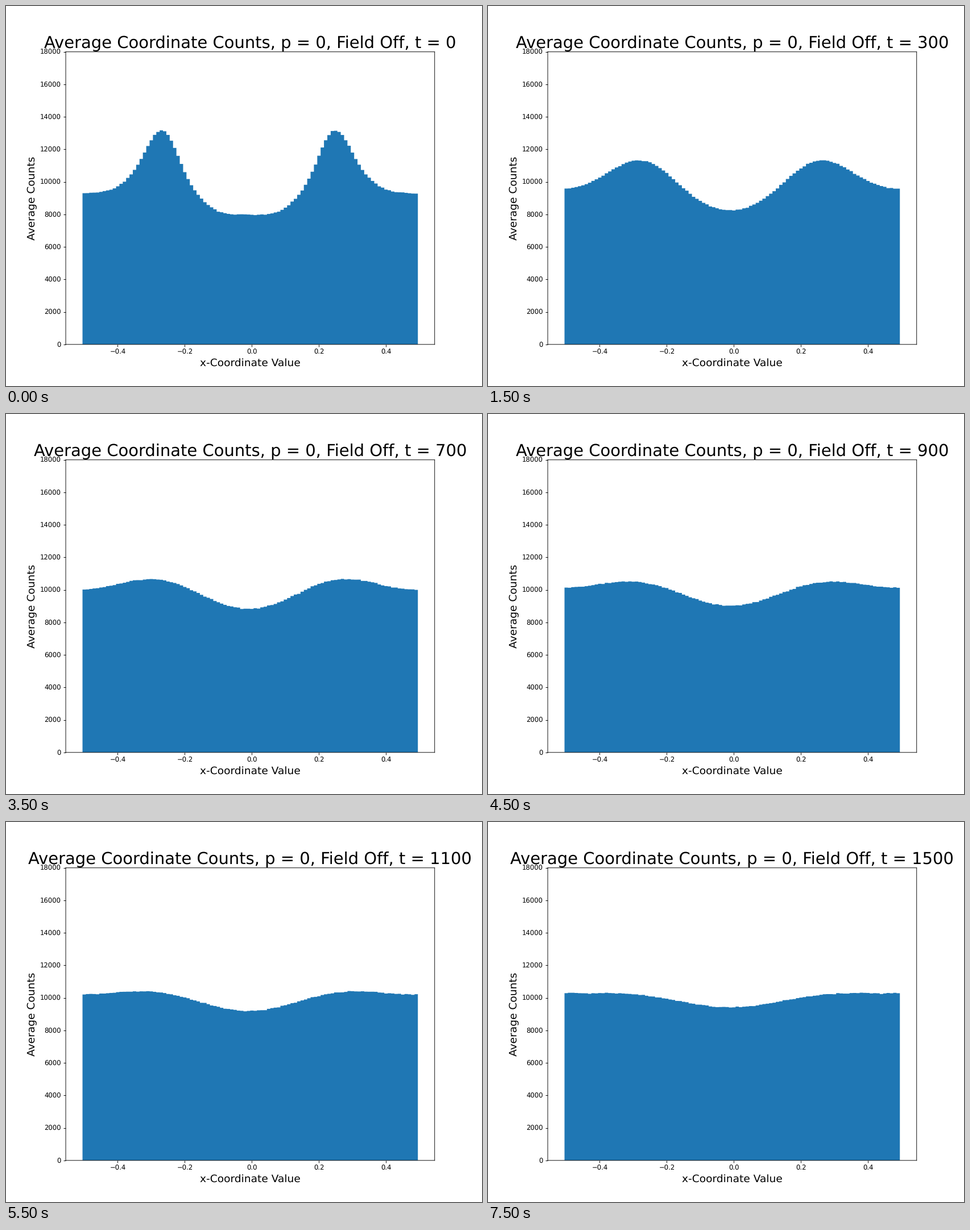
Write a matplotlib script that moves like this. It is 837x669 px and loops after 8 s.

```python
import numpy as np
import matplotlib.pyplot as plt
from matplotlib.animation import FuncAnimation

WIDTH, HEIGHT, DPI = 837, 669, 83.7
FRAMES, INTERVAL, STEP = 16, 500, 100
BINS, CENTER = 100, 49
DECAY = 0.000435  # decay rate of the slowest mode
NOISE = 16

# Starting profile, every fifth bin from the middle to the edge.
START = np.array([7970, 8000, 8290, 9200, 11100, 13100,
                  12190, 10480, 9620, 9355, 9300])

# Cosine modes of the mirror-symmetric, periodic profile.
modes = np.arange(len(START))
node_basis = np.cos(np.pi * np.outer(modes, modes) / modes[-1])
amplitude = np.linalg.solve(node_basis, START)
distance = np.abs(np.arange(BINS) - CENTER)
bin_basis = np.cos(2 * np.pi * np.outer(distance, modes) / BINS)


def counts(t):
    """Counts per bin after the starting profile has diffused for time t."""
    smooth = bin_basis @ (amplitude * np.exp(-DECAY * modes**2 * t))
    return smooth + np.random.default_rng(t).normal(0, NOISE, BINS)


# Soft edges: no snapping of lines or glyphs to whole pixels.
plt.rcParams.update({
    "font.family": "DejaVu Sans",
    "path.snap": False,
    "text.hinting": "none",
})
size = ((WIDTH + 0.001) / DPI, (HEIGHT + 0.001) / DPI)
fig, ax = plt.subplots(figsize=size, dpi=DPI)
fig.subplots_adjust(left=0.1255, right=0.9005, bottom=0.1094, top=0.8794)

edges = (np.arange(BINS + 1) - BINS / 2 - 0.5) / BINS
hist = ax.stairs(counts(0), edges, fill=True, color="#1f77b4")
ax.set_xlim(-0.555, 0.545)
ax.set_ylim(0, 18000)
ax.set_xlabel("x-Coordinate Value", fontsize=16)
ax.set_ylabel("Average Counts", fontsize=16)
title = ax.set_title("", fontsize=25)


def update(frame):
    t = frame * STEP
    hist.set_data(counts(t))
    title.set_text(f"Average Coordinate Counts, p = 0, Field Off, t = {t}")
    return hist, title


anim = FuncAnimation(fig, update, frames=FRAMES, interval=INTERVAL,
                     repeat=True, repeat_delay=0)
plt.show()
```
